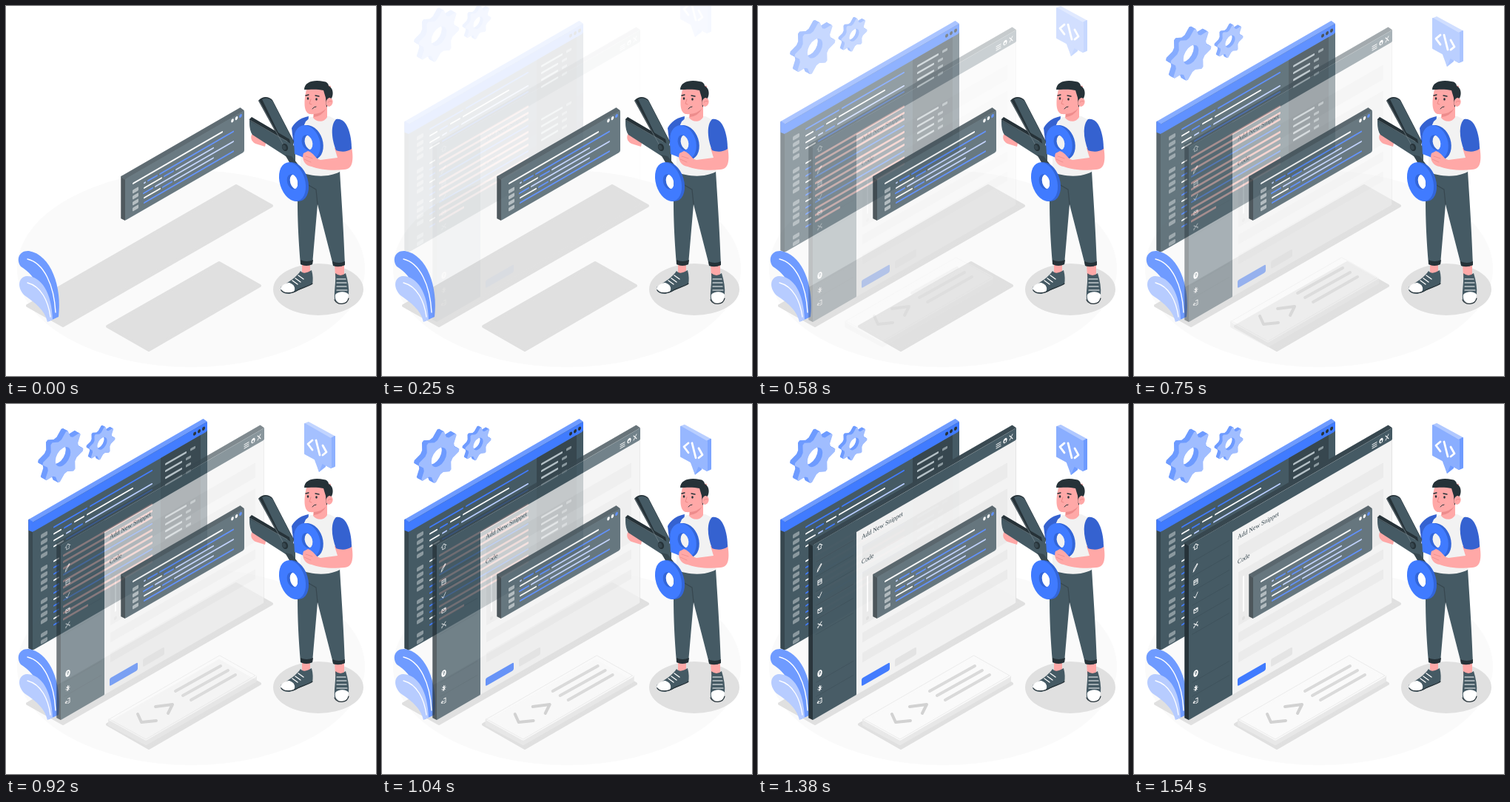
Write an HTML page that moves like this. It is 500x500 px and loops after 1620 ms.

```html
<!DOCTYPE html>
<html lang="en">
<head>
<meta charset="utf-8">
<title>Code snippet</title>
<style>
html, body { margin: 0; width: 100%; height: 100%; overflow: hidden; background: #fff; }
svg { display: block; width: 100vw; height: 100vh; }
text { font-family: "Liberation Serif", serif; font-size: 9px; fill: #37474f; }
</style>
</head>
<body>
<svg id="stage" viewBox="0 0 500 500"></svg>
<script>
const BLUE = '#407bff', SLATE = '#455a64', DARK = '#37474f', INK = '#263238',
      SKIN = '#ffa8a7', PALE = '#b7ccff', GREY = '#e0e0e0', SLOPE = 0.577;

const path = (d, fill, extra = '') => `<path d="${d}" fill="${fill}" ${extra}/>`;
const stroke = (d, color, width = 1) =>
  `<path d="${d}" fill="none" stroke="${color}" stroke-width="${width}" stroke-linecap="round" stroke-linejoin="round"/>`;
const oval = (x, y, rx, ry, fill, turn = 0) =>
  `<ellipse rx="${rx}" ry="${ry}" fill="${fill}" transform="translate(${x} ${y}) rotate(${turn})"/>`;
const rect = (x, y, w, h, fill, r = 0) =>
  `<rect x="${x}" y="${y}" width="${w}" height="${h}" rx="${r}" fill="${fill}"/>`;
const bar = (x, y, end, color, h = 2) => rect(x, y - h / 2, end - x, h, color, 1);
const rounded = (d, fill, width = 4) =>
  path(d, fill, `stroke="${fill}" stroke-width="${width}" stroke-linejoin="round"`);
const plane = (x, y, body) => `<g transform="matrix(1 ${-SLOPE} 0 1 ${x} ${y})">${body}</g>`;
const group = (id, body) => `<g id="${id}">${body}</g>`;

// Upright board: front face plus its left and top edges
function board(w, h, face, side, top) {
  const back = -6.4;
  return rounded(`M0 0L-5 ${back}V${h + back}L0 ${h - 1}Z`, side, 1.5) +
    rounded(`M0 0L-5 ${back}H${w - 6}L${w - 1} 0Z`, top, 1.5) + rect(0, 0, w, h, face, 2);
}

function floor() {
  return oval(250, 355, 235, 133, '#fafafa') +
    rounded('M311 243L359 270L77 432L29 405Z', GREY) +
    rounded('M288 347L343 378L193 465L137 433Z', GREY) +
    oval(422, 383, 61, 35, GREY);
}

function editor() {
  let s = board(236, 173, SLATE, DARK, '#6e9bff') + rect(0, 0, 236, 13, BLUE, 2);
  s += rounded('M0 0L-5 -6V7L0 12Z', BLUE, 1.5) + rect(173, 13, 54, 150, DARK);
  for (const x of [219, 225, 231]) s += oval(x, 6.5, 2, 2.4, INK, -15);
  for (const [first, count] of [[26, 4], [71, 4], [115, 4], [160, 2]])
    for (let i = 0; i < count; i++) s += rect(11, first + i * 9 - 3, 9, 5.5, '#8b999f', 1.5);
  s += bar(28, 23, 74, BLUE) + bar(77, 23, 162, BLUE) +
    bar(28, 32, 39, '#fff') + bar(42, 32, 53, BLUE) + bar(56, 32, 70, '#fff') + bar(73, 32, 136, '#fff') +
    bar(28, 41, 42, '#fff') + bar(45, 41, 52, PALE) + bar(55, 41, 68, BLUE) + bar(71, 41, 162, PALE) +
    bar(28, 49, 42, '#fff') + bar(45, 49, 162, BLUE);
  for (let i = 0; i < 11; i++) {
    const y = 69 + i * 8.6, blue = i % 4 == 3;
    s += bar(28, y, 36, i % 3 ? BLUE : '#fff') + bar(41, y, i == 10 ? 75 : 162, blue ? BLUE : '#f9b0a8', blue ? 2 : 3);
  }
  for (const y of [25, 97])
    for (let i = 0; i < 4; i++) {
      const end = i ? 202 : 208;
      s += bar(179, y + i * 9.3, end, '#b4c0c6', 2.8) + bar(end + 5, y + i * 9.3, end + 12, '#8b999f', 3.5);
    }
  return plane(36, 160, s);
}

function gear(x, y, r, depth) {
  const inner = r * 0.76, h = r * 0.37;
  let d = '';
  for (let i = 0; i < 32; i++) {
    const a = (i + 0.5 + (i % 4 == 0 ? 0.25 : i % 4 == 1 ? -0.25 : 0)) * Math.PI / 16;
    const q = i % 4 < 2 ? r : inner;
    d += (i ? 'L' : 'M') + (q * Math.cos(a)).toFixed(1) + ' ' + (q * Math.sin(a)).toFixed(1);
  }
  d += `ZM${h} 0A${h} ${h} 0 1 0 ${-h} 0A${h} ${h} 0 1 0 ${h} 0Z`;
  let s = '';
  for (let k = depth; k >= 0; k -= 0.5)
    s += `<g transform="matrix(.866 -.5 0 1 ${x - k} ${y - k * 0.55})">` +
      path(d, k ? '#6e9bff' : '#a0bdff', 'fill-rule="evenodd"') + '</g>';
  return s;
}

function leaves() {
  return path('M58 426C55 392 40 364 20 352C13 342 18 330 31 331C61 336 76 380 71 420Z', '#6f9bff') +
    stroke('M67 414C65 377 51 347 29 342', '#fff', 1.4) +
    path('M56 427C52 410 39 401 25 391C14 380 17 366 28 365C48 365 62 388 63 424Z', PALE) +
    stroke('M60 420C57 399 48 379 29 374', '#fff', 1.3);
}

function form() {
  let s = board(275, 236, '#f3f3f3', INK, DARK);
  s += rect(0, 0, 275, 16, SLATE, 1) + rect(0, 0, 59, 236, SLATE, 1);
  s += rect(67, 40, 196, 20, '#ebebeb') + rect(67, 75, 196, 72, '#ebebeb') +
    rect(67, 157, 196, 13, '#ebebeb') + rect(67, 184, 196, 13, '#ebebeb') +
    rect(73, 84, 2, 48, '#fff') + oval(74, 141, 2, 2.4, GREY) + rect(274, 16, 1, 219, '#e4e4e4');
  s += rect(66, 218, 38, 10.5, BLUE, 2) + rect(111, 218, 29, 10.5, '#e4e4e4', 2);
  for (const y of [25, 45, 65, 84, 103, 123, 188, 207]) s += bar(4, y, 55, '#3d5059', 0.8);
  const icons = [
    [7, 'M-4 0L0-4L4 0M-2 0V4H2V0'], [35.5, 'M3-4L-2 3L-4 5L-3 1L2-5Z'],
    [54.5, 'M-3-3H3V4H-3ZM-3-1H3M-3 1H3'], [73.5, 'M-3 0L-1 3L3-4'],
    [93.5, 'M-3-3H3V3H-3ZL0 0L3-3'], [112.5, 'M-3-3L3 3M3-3L-3 3M-3 2V4M3 2V4'],
    [198.5, 'M-3 0H3M0-4V4M-2-3L2 3M2-3L-2 3'], [215.5, 'M0-3H3V4H0M-4 1H1M-2-1L-4 1L-2 3']
  ];
  for (const [y, d] of icons)
    s += `<g transform="translate(9.5 ${y}) scale(.85)">${stroke(d, '#fff', 1.1)}</g>`;
  s += oval(9.5, 178.5, 3.2, 4.4, '#fff') + stroke('M8.5 177Q10.5 175 10.5 178L9.5 179V180', SLATE);
  s += stroke('M248 7H254M248 9.5H254M248 12H254', '#fff', 1) + oval(260, 8.5, 2.6, 3.3, '#fff') +
    oval(260, 9.5, 1.2, 1.4, SLATE) + stroke('M266 5.5L270 11.5M270 5.5L266 11.5', '#fff', 1);
  const label = (x, y, words) => `<text transform="matrix(.866 -.5 0 1 ${x} ${y})">${words}</text>`;
  return plane(74, 191, s) + label(140, 183, 'Add New Snippet') + label(140, 216.5, 'Code');
}

function card() {
  return rounded('M142 427V433L191 459L339 374V368Z', '#e8e8e8') +
    rounded('M291 342L338 367L191 452L144 426Z', '#fafafa', 5) +
    stroke('M291 340L339 367L191 453L142 426Z', '#e8e8e8', 0.8) +
    stroke('M180 419L185 430L205 428M204 409L227 406L221 418', '#d2d2d2', 4) +
    stroke('M231 388L292 354M241 394L302 360M252 400L312 366', '#dadada', 4);
}

function snippet() {
  let s = board(161, 56, SLATE, INK, DARK) + bar(10, 12, 132, '#fff', 2.2);
  s += oval(145, 4.5, 1.8, 2.3, '#fff') + oval(150.5, 4.5, 1.8, 2.3, '#fff') + oval(156, 4.5, 1.8, 2.3, BLUE);
  for (const y of [23, 31, 39, 47]) s += rect(10, y - 2.5, 8, 5, '#a5b0b5', 1);
  const rows = [[147, BLUE, 46], [120, PALE, 68], [147, PALE, 40], [120, PALE, 66], [147, BLUE, 30]];
  rows.forEach(([end, color, cut], i) => {
    const y = 20 + i * 6.7;
    s += i == 4 ? bar(25, y, end, color) :
      bar(25, y, cut - 18, i % 2 ? '#fff' : PALE) + bar(cut - 16, y, cut - 2, BLUE) + bar(cut, y, end, color);
  });
  return `<g opacity=".8">${plane(161, 234, s)}</g>`;
}

function person() {
  const shoes =
    path('M400 349H411V362L400 364ZM444 349H457V366H445Z', SKIN) +
    path('M398 358C402 363 408 360 413 357C415 364 415 371 414 376C404 379 394 386 383 389C375 389 370 386 371 380C382 373 393 366 398 358Z', SLATE) +
    path('M383 374C389 376 392 381 389 386C383 389 371 388 371 381C374 376 379 374 383 374Z', '#fff') +
    stroke('M372 384C376 389 386 389 394 384C402 380 409 379 414 375', INK, 1.2) +
    stroke('M387 371L394 376M391 368L398 373M395 364L402 369', '#fff', 1.3) +
    path('M445 361Q452 367 459 361C462 371 464 381 463 391C462 401 447 405 444 396C443 386 446 374 445 361Z', SLATE) +
    path('M445 390C449 385 460 385 463 390C463 399 459 402 453 402C447 401 444 397 445 390Z', '#fff') +
    stroke('M444 397C448 405 461 404 463 395', INK, 1.2) +
    stroke('M447 369H459M447 374H460M447 379H460M447 384H461', '#fff', 1.2);
  const legs =
    path('M395 218L451 222C453 258 456 294 458 350Q450 353 442 350L421 268L414 349Q406 352 398 349C394 300 393 264 395 218Z', SLATE) +
    path('M398 343Q406 347 415 343L414 349Q406 353 398 349ZM441 345Q450 349 458 345V350Q450 354 442 351Z', INK) +
    stroke('M421 268L419 248L407 241', DARK, 1.2);
  const torso =
    path('M409 149C398 151 390 157 386 165L390 199H405Z', '#3562d0') +
    path('M412 150L437 149L447 154C454 174 453 205 451 224C434 233 411 230 397 224C400 207 394 178 405 156Z', '#f2f2f2') +
    path('M416 140L434 135V150C430 158 419 157 415 151Z', SKIN);
  const head =
    path('M406 113C403 125 401 143 410 146C422 147 431 142 435 134L439 108L418 104Z', SKIN) +
    path('M403 113C403 102 417 99 429 102C433 102 436 105 436 108C444 112 442 123 439 126L433 137L432 124L429 114C421 112 410 113 403 113Z', INK) +
    oval(437, 130, 4.5, 6, SKIN, 12) + stroke('M435 130Q438 127 440 129', '#e88483', 0.8) +
    oval(408, 125, 1.3, 1.7, INK) + oval(419.5, 126, 1.3, 1.7, INK) +
    stroke('M405 121L409 120M418 121L423 122', INK, 1.3) +
    stroke('M412 126L410 132L413 133', '#e88483', 0.9) + stroke('M414 139Q416 136 419 136', INK, 1) +
    path('M416 146Q427 145 433 138Q427 149 416 150Z', '#ed8c8c');
  return shoes + legs + torso + head;
}

function ring(x, y, rx, ry, turn) {
  const loop = (a, b) => `M${a} 0A${a} ${b} 0 1 0 ${-a} 0A${a} ${b} 0 1 0 ${a} 0Z`;
  const d = loop(rx, ry) + loop(7, 10.5);
  const layer = (dx, fill) => `<g transform="translate(${x + dx} ${y}) rotate(${turn})">` +
    path(d, fill, 'fill-rule="evenodd"') + '</g>';
  return layer(1, '#3366d8') + layer(-1, '#3366d8') + layer(-3, BLUE);
}

function scissors() {
  return path('M334 171C329 176 331 183 337 186L350 190L352 181Z', SKIN) +
    path('M341 128C346 122 354 121 360 127L389 183L384 202L375 190Z', INK) +
    path('M346 126Q353 122 360 128L389 184L382 200Z', SLATE) +
    path('M329 153L332 150L383 180L389 208L330 167Z', INK) +
    path('M329 155L380 183L391 190V211L378 203L333 174Q329 169 329 155Z', SLATE) +
    stroke('M342 128L375 188M329 154L380 183', '#75858c', 0.7) +
    path('M377 201L386 203L397 217L388 220Z', DARK) + oval(377, 191, 4, 5.2, INK, -20) + oval(376, 191, 2.5, 3.5, DARK, -20) +
    ring(410, 184.5, 17, 24, -18) + path('M389 183L397 193L413 203L408 207L390 200Z', BLUE) +
    ring(390, 237.5, 17, 27, -17);
}

function arm() {
  return path('M444 192L467 190C470 207 469 221 457 221C441 223 423 221 413 217C404 216 399 207 402 199L408 196C417 199 418 207 425 208L448 205Z', SKIN) +
    path('M446 153C460 150 467 172 467 193C460 198 452 197 446 195C440 180 438 161 446 153Z', '#3562d0') +
    stroke('M403 207L412 211M405 203L414 206', '#ed8c8c', 0.8);
}

function bubble() {
  return rounded('M404 29L409 27L444 46L439 49Z', '#b0c8ff', 2) +
    rounded('M439 49L444 46V86L439 88Z', '#6e9bff', 2) +
    path('M418 76L423 94L432 87V80Z', '#6e9bff') +
    rounded('M404 29L439 49V88L404 69Z', '#8aaeff', 2) + path('M416 75L423 94L428 82Z', '#8aaeff') +
    stroke('M414 51L408 56L414 64M428 58L433 67L428 71M419 51L424 71', '#fff', 2.8);
}

const stage = document.getElementById('stage');
stage.innerHTML = floor() + group('editor', editor()) +
  group('gears', gear(77, 72, 32, 6.5) + gear(130, 54, 20.5, 4)) + leaves() +
  group('form', form()) + group('card', card()) + snippet() +
  person() + scissors() + arm() + group('bubble', bubble());

const parts = Object.fromEntries(['editor', 'gears', 'form', 'card', 'bubble']
  .map(id => [id, document.getElementById(id)]));

function ease(t, from, to) {
  const p = Math.min(1, Math.max(0, (t - from) / (to - from)));
  return p * p * (3 - 2 * p);
}
function along(t, keys) {
  const i = keys.findIndex(k => k[0] > t);
  if (i < 0) return keys[keys.length - 1][1];
  if (!i) return keys[0][1];
  const [t0, a] = keys[i - 1], [t1, b] = keys[i];
  return a + (b - a) * (t - t0) / (t1 - t0);
}
function pose(el, opacity, x = 0, y = 0) {
  el.setAttribute('opacity', opacity.toFixed(3));
  el.setAttribute('transform', `translate(${x.toFixed(2)} ${y.toFixed(2)})`);
}

function draw(now) {
  const t = now % 1620;
  const early = ease(t, 60, 1000), late = ease(t, 90, 1500);
  pose(parts.editor, early);
  pose(parts.gears, early, 0, -35 * (1 - early));
  pose(parts.form, late);
  pose(parts.bubble, ease(t, 60, 1300), 0, along(t, [[250, -52], [420, -41], [580, -26], [750, -12], [920, -2], [1080, 3], [1210, 4], [1540, 0]]));
  pose(parts.card, ease(t, 340, 1150), along(t, [[400, -36], [580, -23], [750, -10], [920, -2], [1210, 2], [1540, 0]]));
  requestAnimationFrame(draw);
}
draw(performance.now());
</script>
</body>
</html>
```
